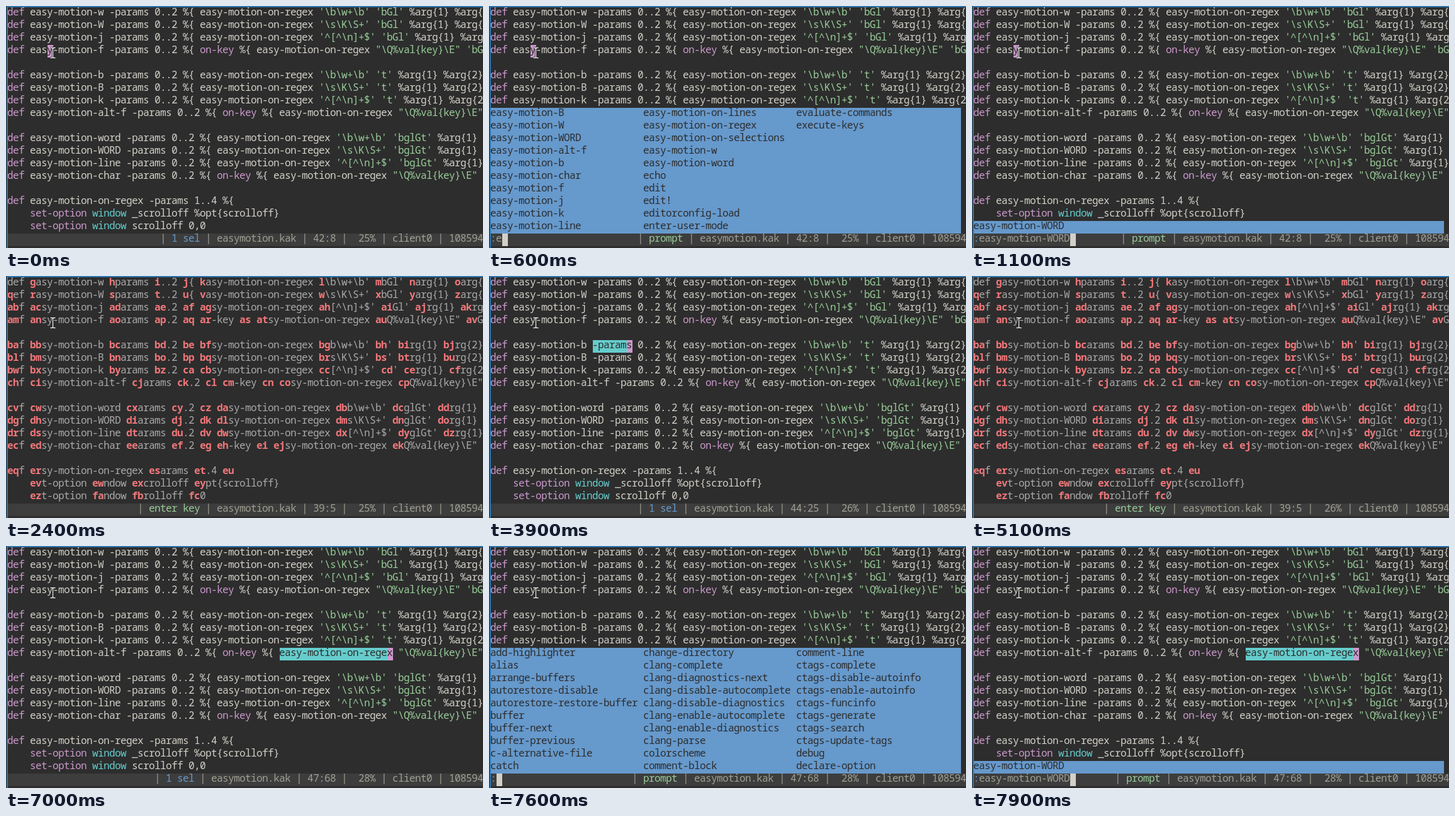
These frames come from a looping animation (758 px wide and 385 px high, 8000 ms). An HTML page:

```html
<!DOCTYPE html>
<html lang="en">
<head>
<meta charset="utf-8">
<title>Easy motion in a terminal editor</title>
<style>
  html, body { margin: 0; width: 100%; height: 100%; overflow: hidden; background: #2d2d2d; }
  svg { display: block; }
  text { font: 16px "Noto Sans Mono", "DejaVu Sans Mono", monospace; letter-spacing: -.6px; white-space: pre; }
  .bold { font-weight: 700; }
</style>
</head>
<body>
<svg width="758" height="385" viewBox="0 0 758 385">
  <defs>
    <path id="beam" d="M70.5 66.5h3l1 1 1-1h3M74.5 67.5v14M70.5 82.5h3l1-1 1 1h3" fill="none"/>
  </defs>
  <g id="screen"></g>
  <path d="M2 385V1H758" fill="none" stroke="#2f76ae" stroke-width="2"/>
  <use href="#beam" stroke="#111" stroke-width="3"/>
  <use href="#beam" stroke="#fff" stroke-width="1.3"/>
</svg>
<script>
const COLS = 84, CELL_W = 9, CELL_H = 20, LEFT = 3, TOP = 2, STATUS_ROW = 18, LOOP = 8000;
const color = {
  bg: '#2d2d2d', fg: '#d3d0c8', dim: '#aaaaaa', bar: '#3d3d3d', barText: '#a09f93',
  red: '#f2777a', yellow: '#ffcc66', green: '#99cc99', cyan: '#66cccc',
  blue: '#6699cc', magenta: '#cc99cc', track: '#587ea5'
};

// Buffer contents
const regexes = [String.raw`'\b\w+\b'`, String.raw`'\s\K\S+'`, String.raw`'^[^\n]+$'`];
const block = (names, callback) => names.map((name, i) => {
  const key = i === 3;
  const regex = key ? String.raw`"\Q%val{key}\E"` : regexes[i];
  return `def easy-motion-${name} -params 0..2 %{ ${key ? 'on-key %{ ' : ''}easy-motion-on-regex ` +
    `${regex} '${callback}' %arg{1} %arg{2} }${key ? ' }' : ''}`;
});
const lines = [
  ...block(['w', 'W', 'j', 'f'], 'bGl'), '',
  ...block(['b', 'B', 'k', 'alt-f'], 't'), '',
  ...block(['word', 'WORD', 'line', 'char'], 'bglGt'), '',
  'def easy-motion-on-regex -params 1..4 %{',
  '    set-option window _scrolloff %opt{scrolloff}',
  '    set-option window scrolloff 0,0'
];

// Jump labels: g..z, then two letters starting with a..f
const letters = [...'abcdefghijklmnopqrstuvwxyz'];
const labels = [...letters.slice(6), ...letters.slice(0, 6).flatMap(a => letters.map(b => a + b))];
const targets = lines.flatMap((line, row) =>
  [...line.matchAll(/\S+/g)].map(m => ({ row, col: m.index }))).slice(1);
targets.forEach((target, i) => target.label = labels[i]);

// Completion candidates
const allCommands = `add-highlighter alias arrange-buffers autorestore-disable autorestore-restore-buffer
  buffer buffer-next buffer-previous c-alternative-file catch change-directory clang-complete
  clang-diagnostics-next clang-disable-autocomplete clang-disable-diagnostics clang-enable-autocomplete
  clang-enable-diagnostics clang-parse colorscheme comment-block comment-line ctags-complete
  ctags-disable-autoinfo ctags-enable-autoinfo ctags-funcinfo ctags-generate ctags-search
  ctags-update-tags debug declare-option`.split(/\s+/);
const motions = ['B', 'W', 'WORD', 'alt-f', 'b', 'char', 'f', 'j', 'k', 'line',
  'on-lines', 'on-regex', 'on-selections', 'w', 'word'].map(name => 'easy-motion-' + name);
const eCommands = [...motions, 'echo', 'edit', 'edit!', 'editorconfig-load', 'enter-user-mode',
  'evaluate-commands', 'execute-keys'];
const chosen = 'easy-motion-WORD';
const candidates = { '': allCommands, e: eCommands, ea: motions, [chosen]: [chosen] };

// Drawing helpers on the character grid
const x = col => LEFT + col * CELL_W;
const y = row => TOP + row * CELL_H;
const rect = (row, col, width, fill, rows = 1) =>
  `<rect x="${x(col)}" y="${y(row)}" width="${width * CELL_W}" height="${rows * CELL_H}" fill="${fill}"/>`;
const span = (text, fill) => `<tspan fill="${fill}">${text}</tspan>`;
const write = (row, col, text, fill, cls = '') =>
  `<text class="${cls}" x="${x(col) - 1}" y="${y(row) + 13}" fill="${fill}">${text}</text>`;

function tokenColor(token) {
  if (/^['"]/.test(token)) return color.green;
  return token === 'window' ? color.cyan : color.magenta;
}
const highlight = line => line.replace(/^def|on-key|set-option|window|'[^']*'?|"[^"]*"?/g,
  token => span(token, tokenColor(token)));

const drawCode = () => lines.map((line, row) =>
  write(row, 0, highlight(line.slice(0, COLS)), color.fg)).join('');

function drawSelection([row, col, length]) {
  const last = col + length - 1;
  return rect(row, col, length - 1, color.cyan) + rect(row, last, 1, color.magenta) +
    write(row, col, lines[row].substr(col, length), color.bg);
}

function drawLabels(prefix) {
  const shown = targets.filter(t => t.col < COLS && t.label.startsWith(prefix));
  return lines.map((line, row) => {
    const cells = [...line.slice(0, COLS)];
    const here = shown.filter(t => t.row === row);
    for (const { col, label } of here) [...label].forEach((_, i) => cells[col + i] = ' ');
    return write(row, 0, cells.join(''), color.dim) + here.map(({ col, label }) =>
      write(row, col, span(prefix, color.yellow) + label.slice(prefix.length), color.red, 'bold')).join('');
  }).join('');
}

function drawMenu(items) {
  const rows = Math.min(10, items.length), top = STATUS_ROW - rows;
  const handle = Math.min(rows, Math.ceil(rows * 30 / items.length));
  return rect(top, 0, COLS - 1, color.blue, rows) +
    rect(top, COLS - 1, 1, color.track, rows) + rect(top, COLS - 1, 1, color.bg, handle) +
    items.map((item, i) => write(top + i % rows, 27 * Math.floor(i / rows), item, color.bg)).join('');
}

function drawPrompt(input) {
  return drawMenu(candidates[input]) +
    write(STATUS_ROW, 0, span(':', color.blue) + input, color.barText) +
    rect(STATUS_ROW, input.length + 1, 1, color.fg);
}

function drawStatus(mode, pos, percent) {
  const tail = ` | easymotion.kak | ${pos} |  ${percent}% | client0 | 108594`;
  const modeColor = mode === '1 sel' ? color.blue : color.green;
  return write(STATUS_ROW, COLS - tail.length - mode.length - 2,
    '| ' + span(mode, modeColor) + tail, color.barText);
}

// Scenes
const first = { sel: [3, 7, 1], pos: '42:8', percent: 25 };
const second = { sel: [5, 18, 7], pos: '44:25', percent: 26 };
const third = { sel: [8, 48, 20], pos: '47:68', percent: 28 };
const jump = (prefix, pos, percent) => ({ prefix, pos, percent });
const typing = (place, input) => ({ ...place, input });
const scenes = [
  [0, first], [500, typing(first, '')], [600, typing(first, 'e')], [1100, typing(first, chosen)],
  [2400, jump('', '39:5', 25)], [3300, jump('b', '44:1', 25)],
  [3900, second], [4400, typing(second, '')], [4500, typing(second, 'e')],
  [4600, typing(second, 'ea')], [4700, typing(second, chosen)],
  [5100, jump('', '39:5', 26)], [6000, jump('c', '46:32', 26)],
  [7000, third], [7600, typing(third, '')], [7800, typing(third, 'e')], [7900, typing(third, chosen)]
];

function draw({ sel, input, prefix, pos, percent }) {
  const jumping = prefix !== undefined, prompting = input !== undefined;
  const mode = jumping ? 'enter key' : prompting ? 'prompt' : '1 sel';
  return (jumping ? drawLabels(prefix) : drawCode() + drawSelection(sel)) +
    rect(STATUS_ROW, 0, COLS, color.bar) +
    (prompting ? drawPrompt(input) : '') + drawStatus(mode, pos, percent);
}

const screenGroup = document.getElementById('screen');
const start = performance.now();
let current = null;
function tick() {
  const time = (performance.now() - start) % LOOP;
  const scene = scenes.filter(([at]) => at <= time).pop()[1];
  if (scene !== current) {
    current = scene;
    screenGroup.innerHTML = draw(scene);
  }
  requestAnimationFrame(tick);
}
tick();
</script>
</body>
</html>
```
